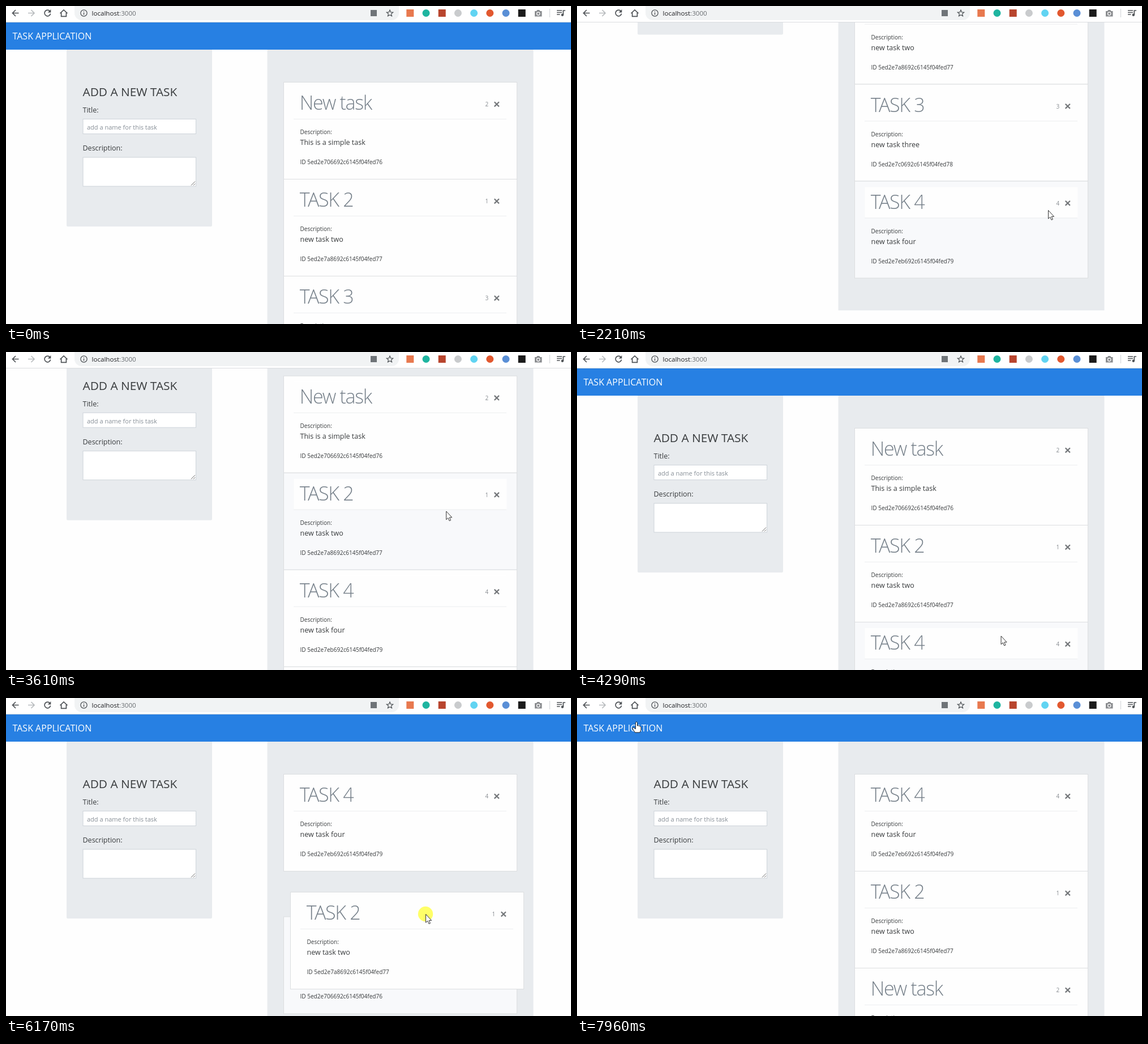
Recreate the animation shown at these times as an HTML page. Size 998x561 px, loop 8000 ms.

```html
<!DOCTYPE html>
<html lang="en">
<head>
<meta charset="utf-8">
<title>Task application</title>
<style>
html, body { margin: 0; width: 100%; height: 100%; overflow: hidden; background: #fefefe; }
svg { display: block; width: 998px; height: 561px; font-family: "Open Sans", "Noto Sans", sans-serif; fill: #373a3c; }
.title { font-size: 34px; font-weight: 300; letter-spacing: -1.3px; fill: #76808a; }
.small { font-size: 10.05px; }
.body { font-size: 12.5px; }
.count { font-size: 10px; fill: #868b90; }
.line { fill: none; stroke: #4f5357; stroke-width: 1.7; }
.field { fill: #fff; stroke: #ced4da; }
</style>
</head>
<body>
<svg viewBox="0 0 998 561">
  <g id="page">
    <rect y="29" width="998" height="48" fill="#2780e3"/>
    <text x="11.5" y="59" font-size="16" fill="#fff">TASK APPLICATION</text>
    <path d="M107 77H364V387Q364 389 362 389H109Q107 389 107 387Z" fill="#e8ebee"/>
    <rect x="461.5" y="77" width="470" height="798.5" fill="#e8ebee"/>
    <text x="135.5" y="159" font-size="20.8">ADD A NEW TASK</text>
    <text class="body" x="135.5" y="188">Title:</text>
    <rect class="field" x="136" y="199.5" width="199.5" height="26"/>
    <text x="143" y="218" font-size="11" fill="#868e96">add a name for this task</text>
    <text class="body" x="135.5" y="255">Description:</text>
    <rect class="field" x="136" y="267" width="199.5" height="51"/>
    <path d="M327 316.5L334 309.5M331 316.5L334 313.5" stroke="#666" fill="none"/>
    <g id="list"></g>
  </g>

  <g id="toolbar">
    <rect width="998" height="28.5" fill="#fff"/>
    <path d="M0 28.5H998" stroke="#dadce0"/>
    <path d="M121 0H694V12.5A12.5 12.5 0 0 1 681.5 25H133.5A12.5 12.5 0 0 1 121 12.5Z" fill="#f1f3f4"/>
    <path class="line" d="M22.5 12.5H11.5M17 7L11.5 12.5L17 18"/>
    <path class="line" d="M39 12.5H50M44.5 7L50 12.5L44.5 18" style="stroke:#b8bbbe"/>
    <path class="line" d="M77.6 9.2A5.3 5.3 0 1 0 78.6 13.5"/>
    <path d="M79.3 6V11.6H73.7Z" fill="#4f5357"/>
    <path class="line" d="M95.5 13L102 6.8L108.5 13M97.6 11.8V18.4H106.4V11.8"/>
    <circle class="line" cx="137.5" cy="12.5" r="5.6" style="stroke-width:1.3"/>
    <path class="line" d="M137.5 11.8V15.5M137.5 9.2V10.5" style="stroke-width:1.4"/>
    <text x="151.5" y="17" font-size="11.6" fill="#202124">localhost<tspan fill="#686c70">:3000</tspan></text>
    <rect x="644" y="7" width="11" height="11" fill="#6f7478"/>
    <path id="star" class="line" style="stroke-width:1.2"/>
    <g id="extensions"></g>
    <path d="M934 9H937L938.2 7H942.2L943.4 9H946.5V18.5H934Z" fill="#8a8c8f"/>
    <circle cx="940.2" cy="13.6" r="2.7" fill="#8a8c8f" stroke="#fff" stroke-width="1.2"/>
    <path d="M960.5 5V20" stroke="#d0d3d6"/>
    <path class="line" d="M973 8H982M973 11.5H982M973 15H978.5M984.3 16V8H988"/>
    <circle cx="982.8" cy="15.8" r="2.2" fill="#4f5357"/>
  </g>

  <g id="pointer">
    <circle id="press" r="13.2" fill="#ffff4d" fill-opacity=".85"/>
    <path id="arrow" d="M.5 .5V15.2L3.8 12.2L6 17.4L8.4 16.4L6.2 11.4H10.6Z" fill="#fff" stroke="#333"/>
    <path id="hand" d="M-1.6 1.2Q0 -1.2 1.5 1.2V7L3.7 6.8L6.2 7.7L8 9V14L6 18.8H-2.5L-7 12Q-7.6 9.8 -5.3 10L-1.6 12.6Z" fill="#fff" stroke="#222"/>
  </g>
</svg>
<script>
const LOOP = 8000, REFRESH = 79, ENTER = 180;
const LEFT = 490, TOP = 134, WIDTH = 412, PITCH = 171, SHIFT = 220;
const $ = id => document.getElementById(id);

// the screen refreshes at a steady rate from the start of each action
const actions = [180, 820, 2210, 3120, 3980, 4440, 5380, 6250, 6780, 7640];

// each glide: start, end, destination
const cursorPath = [
  [180, 420, 836, 354], [1000, 1200, 832, 360], [2250, 2700, 826, 160], [2850, 3120, 785, 220],
  [3300, 4290, 748, 505], [4440, 5080, 759, 190], [5160, 5750, 729, 515], [5860, 6170, 741, 381],
  [6170, 6480, 738, 322], [6780, 7570, 200, 121], [7640, 7960, 105, 42]
];
const scrollPath = [[820, 1200, 338.5], [3200, 3800, 0]];

// shifts: time, new slot
const cards = [
  { title: "New task", n: 2, desc: "This is a simple task", id: "5ed2e706692c6145f04fed76", shifts: [[4940, 1], [6128, 2]] },
  { title: "TASK 2", n: 1, desc: "new task two", id: "5ed2e7a8692c6145f04fed77", shifts: [[4710, 2]] },
  { title: "TASK 3", n: 3, desc: "new task three", id: "5ed2e7c0692c6145f04fed78", shifts: [[2460, 3]] },
  { title: "TASK 4", n: 4, desc: "new task four", id: "5ed2e7eb692c6145f04fed79", shifts: [] }
];
const drags = [
  { card: 3, start: 2250, release: 2750, end: 2980, from: 3, to: 2 },
  { card: 3, start: 4482, release: 5150, end: 5240, from: 2, to: 0 },
  { card: 1, start: 5860, release: 6560, end: 6620, from: 2, to: 1 }
];

const clamp = p => Math.max(0, Math.min(1, p));
const easeOut = p => 1 - (1 - clamp(p)) ** 3;
const smooth = p => (p = clamp(p), p * p * (3 - 2 * p));
const mix = (a, b, p) => a + (b - a) * p;
const slotY = s => TOP + PITCH * s;

const glide = (path, from, t) => path.reduce((pos, [a, b, ...to]) =>
  pos.map((v, k) => mix(v, to[k], smooth((t - a) / (b - a)))), from);
const cursor = t => glide(cursorPath, [909, 543], t);
const scrolled = t => glide(scrollPath, [0], t)[0];

function snap(t) {
  const start = actions.filter(a => a <= t).pop() || 0;
  return t - (t - start) % REFRESH;
}

for (const c of cards) {
  $("list").insertAdjacentHTML("beforeend", `<g>
    <rect x=".5" y=".5" width="${WIDTH}" height="${PITCH}" stroke="#dcdee0"/>
    <rect x="18.5" y="11" width="376" height="54" fill="#fefefe"/>
    <path d="M18 65.5H394" stroke="#eceef0"/>
    <text class="title" x="28.8" y="49.3">${c.title}</text>
    <text class="count" x="356.5" y="43">${c.n}</text>
    <path d="M372.7 35.2L380.9 43.4M380.9 35.2L372.7 43.4" stroke="#74777a" stroke-width="2.2"/>
    <text class="small" x="29.5" y="92">Description:</text>
    <text class="body" x="29.5" y="111">${c.desc}</text>
    <text class="small" x="29.5" y="145">ID ${c.id}</text></g>`);
  c.el = $("list").lastElementChild;
  c.bg = c.el.firstElementChild;
}

const starPoint = (_, i) => {
  const r = i % 2 ? 2.7 : 6, a = i * Math.PI / 5;
  return `${678 + r * Math.sin(a)} ${13 - r * Math.cos(a)}`;
};
$("star").setAttribute("d", `M${Array.from({ length: 10 }, starPoint).join("L")}Z`);

const squares = ["#e8794f", "#b8452e", "#1b1b1b"];
["#e8794f", "#1fb5a0", "#b8452e", "#c9cbcd", "#61d4f2", "#e2582f", "#5a8fd6", "#1b1b1b"].forEach((color, i) =>
  $("extensions").insertAdjacentHTML("beforeend",
    `<rect x="${707.3 + 28.2 * i}" y="6" width="13" height="13" rx="${squares.includes(color) ? 0 : 6.5}" fill="${color}"/>`));

function place(c, i, t) {
  let x = LEFT, y = slotY(i);
  for (const [at, to] of c.shifts) y = mix(y, slotY(to), easeOut((t - at) / SHIFT));
  for (const d of drags) {
    if (d.card !== i || t < d.start) continue;
    const [gx, gy] = cursor(d.start), [cx, cy] = cursor(Math.min(t, d.release));
    const drop = easeOut((t - d.release) / (d.end - d.release));
    x = mix(LEFT + cx - gx, LEFT, drop);
    y = mix(slotY(d.from) + cy - gy, slotY(d.to), drop);
  }
  return [x, y];
}

// while dragging, the card pushed aside last stays highlighted
function hovered(t, cx, pageY, spots, drag) {
  if (t < ENTER) return -1;
  if (drag) return cards.findLastIndex(c => c.shifts.some(([at]) => at <= t && at >= drag.start && t - at < SHIFT));
  return spots.findIndex(([x, y]) => cx > x && cx < x + WIDTH && pageY > y && pageY < y + PITCH);
}

function draw(time) {
  const t = snap(time), scroll = scrolled(t), [cx, cy] = cursor(t);
  const drag = drags.find(d => t >= d.start && t < d.end);
  const spots = cards.map((c, i) => place(c, i, t));
  const over = hovered(t, cx, cy + scroll, spots, drag);

  $("page").setAttribute("transform", `translate(0 ${-scroll})`);
  cards.forEach((c, i) => {
    c.el.setAttribute("transform", `translate(${spots[i]})`);
    c.bg.setAttribute("fill", i === over ? "#f8f9fb" : "#fefefe");
  });
  const top = drag && cards[drag.card].el;
  if (top && $("list").lastElementChild !== top) $("list").append(top);

  const link = cx < 165 && cy < 70;
  const show = (id, on) => $(id).setAttribute("visibility", on ? "visible" : "hidden");
  $("pointer").setAttribute("transform", `translate(${cx} ${cy})`);
  show("arrow", t >= ENTER && !link);
  show("hand", link);
  show("press", drag && t < drag.release);
}

const begin = performance.now();
function tick() {
  draw((performance.now() - begin) % LOOP);
  requestAnimationFrame(tick);
}
tick();
</script>
</body>
</html>
```
